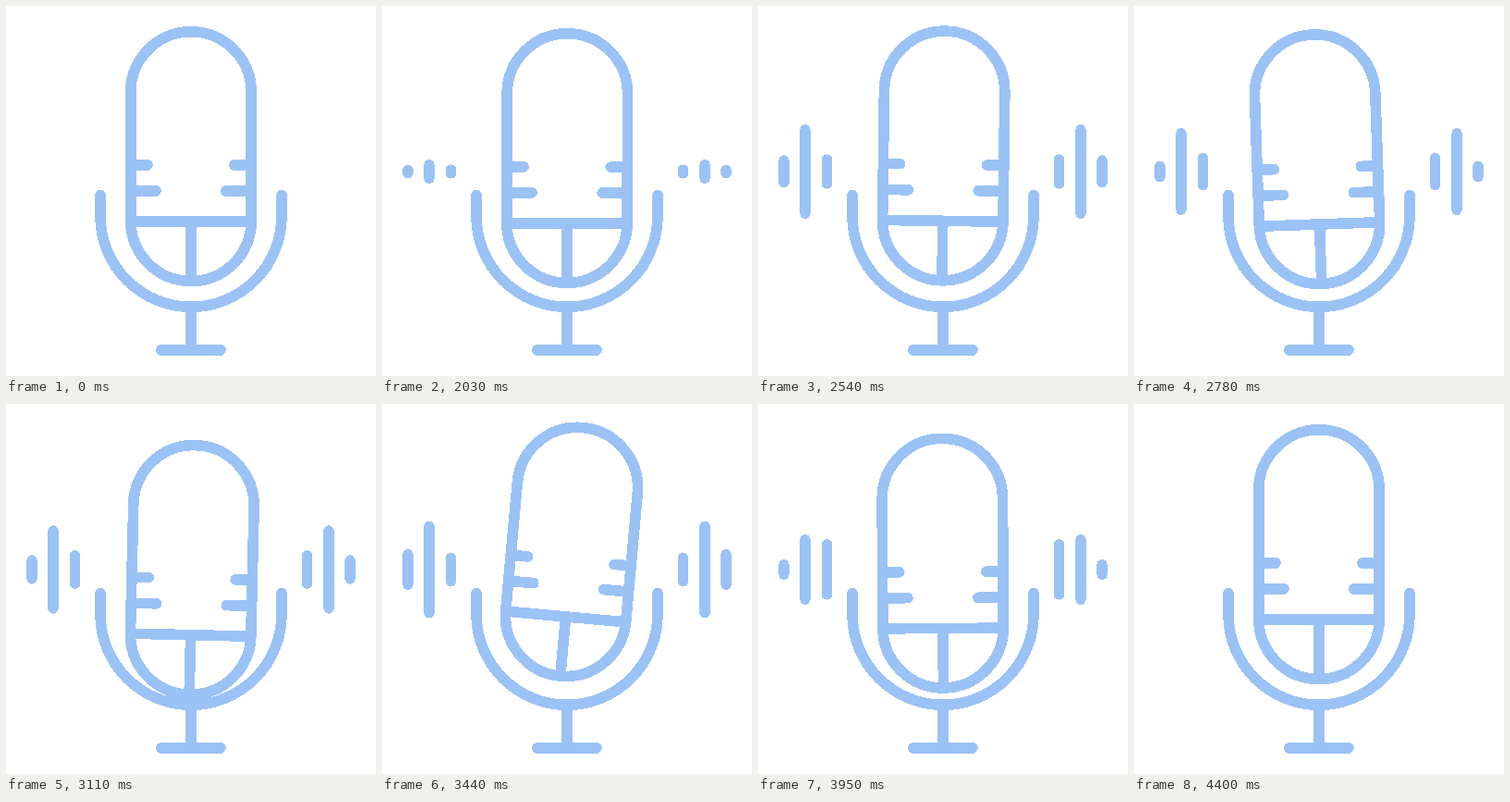
These frames come from a looping animation (400 px wide and 400 px high, 4.43 s). An HTML page:

```html
<!DOCTYPE html>
<html lang="en">
<head>
<meta charset="utf-8">
<title>Microphone</title>
<style>
  html, body { margin: 0; width: 100%; height: 100%; overflow: hidden; background: #fff; }
  svg { display: block; width: 100%; height: 100%; }
  path {
    fill: none; stroke: #9bc2f5; stroke-width: 11.6; stroke-linecap: round;
    shape-rendering: crispEdges;
  }
  #bars { stroke-width: 11.4; }
</style>
</head>
<body>
<svg viewBox="0 0 400 400">
  <path d="M102 204.3V227A98 98.3 0 0 0 298 227V204.3M200 325V372M168 372H232"/>
  <g id="mic">
    <path d="M134.8 93A65.2 65.2 0 0 1 265.2 93V232.3A65.2 65.2 0 0 1 134.8 232.3ZM135 233H265M200 233V297.5"/>
    <path d="M135 172H153M135 200H162M265 172H247M265 200H238"/>
  </g>
  <path id="bars"/>
</svg>
<script>
const LOOP = 4430, STEP = 30, BEGIN = 2000, END = 4400;
const PIVOT = "200 218", MID_Y = 179;

// Key poses of the microphone: time, shift down, tilt in degrees.
const poses = [
  [BEGIN, 0, 0],
  [2300, 28, 2.2],
  [2620, -6, 0],
  [2780, 3, -2],
  [3080, 17, 1],
  [3440, -3, 5.2],
  [3570, -8, 4],
  [3950, 9.5, -0.3],
  [END, 0, 0]
];

// Smooth value of one pose channel, without overshoot between poses.
function pose(t, channel) {
  const last = poses.length - 1;
  const slope = i => (poses[i + 1][channel] - poses[i][channel]) / (poses[i + 1][0] - poses[i][0]);
  const tangent = i => {
    if (i === 0) return slope(0) / 2;
    if (i === last) return slope(last - 1) / 2;
    const a = slope(i - 1), b = slope(i);
    return a * b <= 0 ? 0 : 2 * a * b / (a + b);
  };
  const i = Math.max(0, poses.findIndex(p => p[0] >= t) - 1);
  const a = poses[i], b = poses[i + 1];
  const d = b[0] - a[0], u = (t - a[0]) / d, w = 1 - u;
  return a[channel] * w * w * (1 + 2 * u) + b[channel] * u * u * (3 - 2 * u)
    + d * u * w * (tangent(i) * w - tangent(i + 1) * u);
}

// Every bar pulses on the same beat; the dip grows faster the nearer it is to the microphone.
const PERIOD = 1110, FIRST_PEAK = 2300;
const bars = [
  { x: 28, peak: 32.5, dip: 22 },
  { x: 51, peak: 93.5, dip: 36 },
  { x: 74.5, peak: 25, dip: -44 }
];

function barLines(t) {
  const p = (t - BEGIN) / (END - BEGIN);
  const pulse = (1 - Math.cos((t - FIRST_PEAK) / PERIOD * 2 * Math.PI)) / 2;
  const grow = Math.sin(Math.PI / 2 * Math.min(1, (t - BEGIN) / 300, (END - t) / 450));
  return bars.map(({ x, peak, dip }, power) => {
    const h = grow * (peak - dip * pulse * p ** power);
    const line = `${MID_Y - h / 2}v${h}`;
    return `M${x} ${line}M${400 - x} ${line}`;
  }).join("");
}

const mic = document.getElementById("mic");
const wave = document.getElementById("bars");

function draw(t) {
  mic.setAttribute("transform", `translate(0 ${pose(t, 1)}) rotate(${pose(t, 2)} ${PIVOT})`);
  wave.setAttribute("d", t > BEGIN && t < END ? barLines(t) : "");
}

const start = performance.now();
function tick() {
  const t = (performance.now() - start) % LOOP;
  // The picture holds for each step.
  const step = Math.floor((t - BEGIN) / STEP) * STEP;
  draw(Math.min(END, BEGIN + Math.max(0, step)));
  requestAnimationFrame(tick);
}
tick();
</script>
</body>
</html>
```
